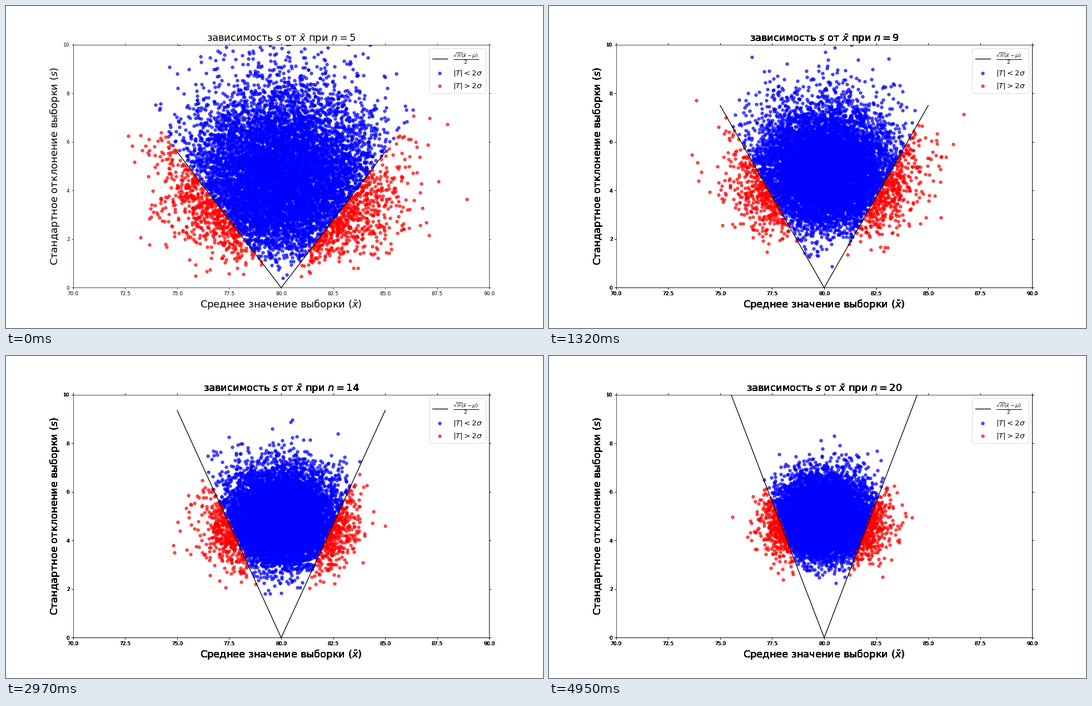
Recreate the animation shown at these times as a matplotlib script. Size 966 by 580 pixels, loop 5.28 s.

```python
import matplotlib.pyplot as plt
import numpy as np
from matplotlib.animation import FuncAnimation

MU, SIGMA, DRAWS = 80, 5, 10000
SIZES = range(5, 21)
LAYERS = 5
DPI = 64.4


def border(x, n):
    return np.sqrt(n) * np.abs(x - MU) / 2


def cloud(n):
    """Sample means and deviations, split into inside and outside the V."""
    rng = np.random.default_rng(100 + n)
    data = rng.normal(MU, SIGMA, (DRAWS, n))
    pts = np.column_stack([data.mean(axis=1), data.std(axis=1, ddof=1)])
    inside = border(pts[:, 0], n) < pts[:, 1]
    return pts[inside], pts[~inside]


def make_axes(zorder):
    ax = fig.add_axes([0.125, 0.125, 0.775, 0.755], zorder=zorder)
    ax.set(xlim=(70, 90), ylim=(0, 10))
    ax.tick_params(top=True, right=True, labelsize=10)
    ax.set_xlabel(r"Среднее значение выборки ($\bar{x}$)", fontsize=20)
    ax.set_ylabel(r"Стандартное отклонение выборки ($s$)", fontsize=20)
    return ax


plt.rcParams["font.family"] = "DejaVu Sans"
fig = plt.figure(figsize=(15, 9.00625), dpi=DPI, facecolor="white")

# The lower axes overprint the lettering, which is heavier after the first step
under = [make_axes(z) for z in range(LAYERS)]
ax = make_axes(LAYERS)

xs = np.linspace(75, 85, 101)
line, = ax.plot(xs, border(xs, SIZES[0]), color="black",
                label=r"$\frac{\sqrt{n}(\bar{x}-\mu)}{2}$")
blue = ax.scatter([], [], color="blue", alpha=0.7, label=r"$|T|<2\sigma$")
red = ax.scatter([], [], color="red", alpha=0.7, label=r"$|T|>2\sigma$")
ax.legend(loc="upper right", fontsize=15)

clouds = [cloud(n) for n in SIZES]


def update(i):
    n = SIZES[i]
    inside, outside = clouds[i]
    blue.set_offsets(inside)
    red.set_offsets(outside)
    line.set_ydata(border(xs, n))
    for a in under + [ax]:
        a.set_title(rf"зависимость $s$ от $\bar{{x}}$ при $n={n}$", fontsize=20)
    for a in under:
        a.set_visible(i > 0)
    return blue, red, line


anim = FuncAnimation(fig, update, frames=len(SIZES), interval=330,
                     repeat=True, repeat_delay=0)
plt.show()
```
